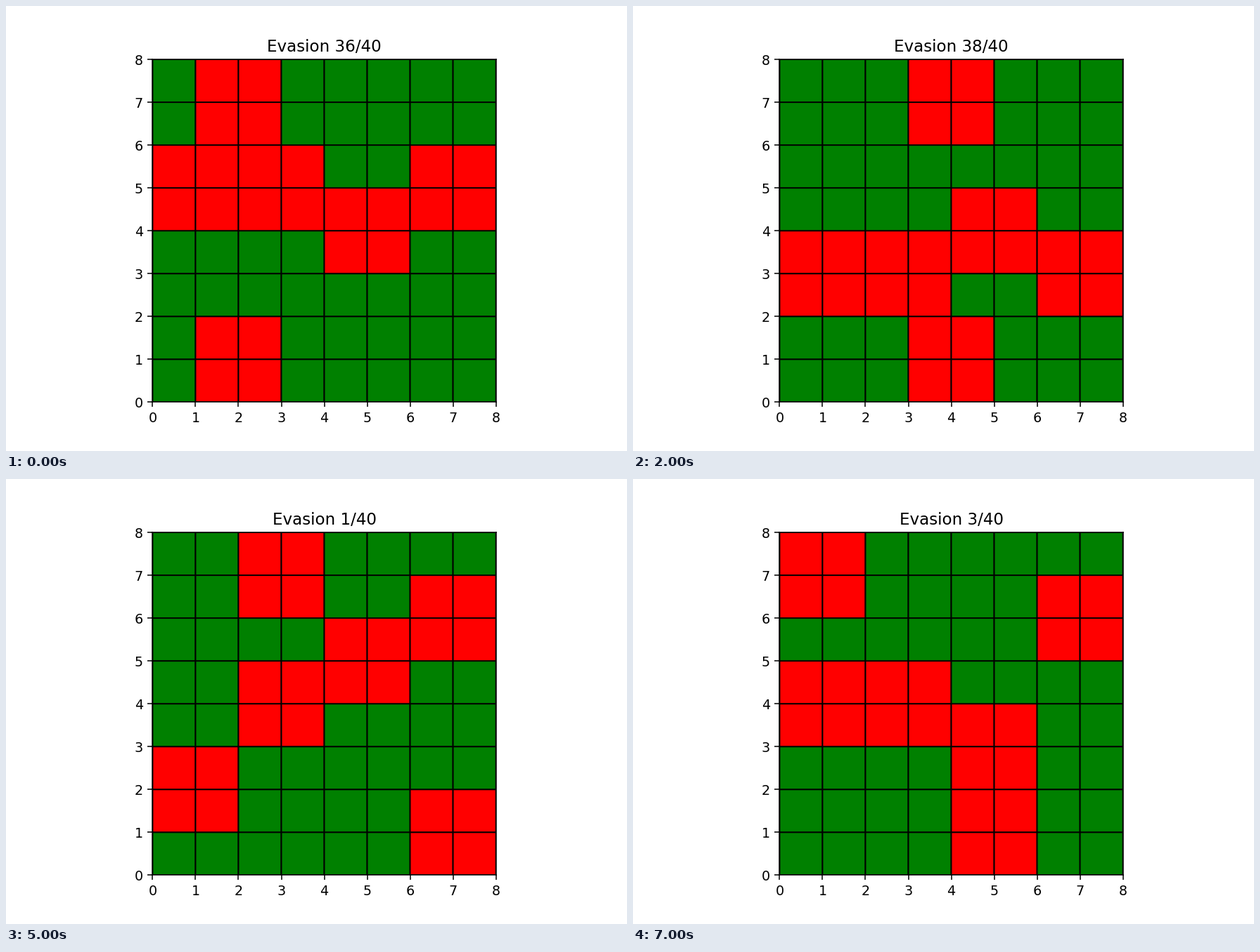
Write a matplotlib script that moves like this. It is 883 by 634 pixels and loops after 8 s.

```python
import matplotlib.pyplot as plt
import numpy as np
from matplotlib.animation import FuncAnimation
from matplotlib.colors import ListedColormap

WIDTH, HEIGHT, DPI = 883, 634, 138
SIZE = 8
STEPS = 40
FIRST_STEP = 36
FRAMES = 8

# Each 2x2 block bounces between two limits: (fixed coordinate, low, high, phase)
ROW_BLOCKS = [(6, 0, 4, 1), (0, 0, 6, 1)]
COLUMN_BLOCKS = [(0, 0, 4, 4), (2, 2, 4, 2), (4, 2, 4, 1), (6, 2, 6, 6)]


def bounce(low, high, phase, t):
    span = high - low
    return low + span - abs((t + phase) % (2 * span) - span)


def make_grid(t):
    grid = np.zeros((SIZE, SIZE))
    for y, *path in ROW_BLOCKS:
        x = bounce(*path, t)
        grid[y:y + 2, x:x + 2] = 1
    for x, *path in COLUMN_BLOCKS:
        y = bounce(*path, t)
        grid[y:y + 2, x:x + 2] = 1
    return grid


# The small margin keeps the pixel size from being rounded down.
fig, ax = plt.subplots(
    figsize=((WIDTH + 0.01) / DPI, (HEIGHT + 0.01) / DPI), dpi=DPI)
ax.set_aspect("equal")
cells = ax.pcolor(make_grid(0), cmap=ListedColormap(["green", "red"]),
                  vmin=0, vmax=1, edgecolors="black", linewidths=1)
ax.set(xlim=(0, SIZE), ylim=(0, SIZE),
       xticks=range(SIZE + 1), yticks=range(SIZE + 1))
title = ax.set_title("")


def update(t):
    cells.set_array(make_grid(t))
    step = (FIRST_STEP + t - 1) % STEPS + 1
    title.set_text(f"Evasion {step}/{STEPS}")
    return cells, title


anim = FuncAnimation(fig, update, frames=FRAMES, interval=1000, repeat=True)
plt.show()
```
